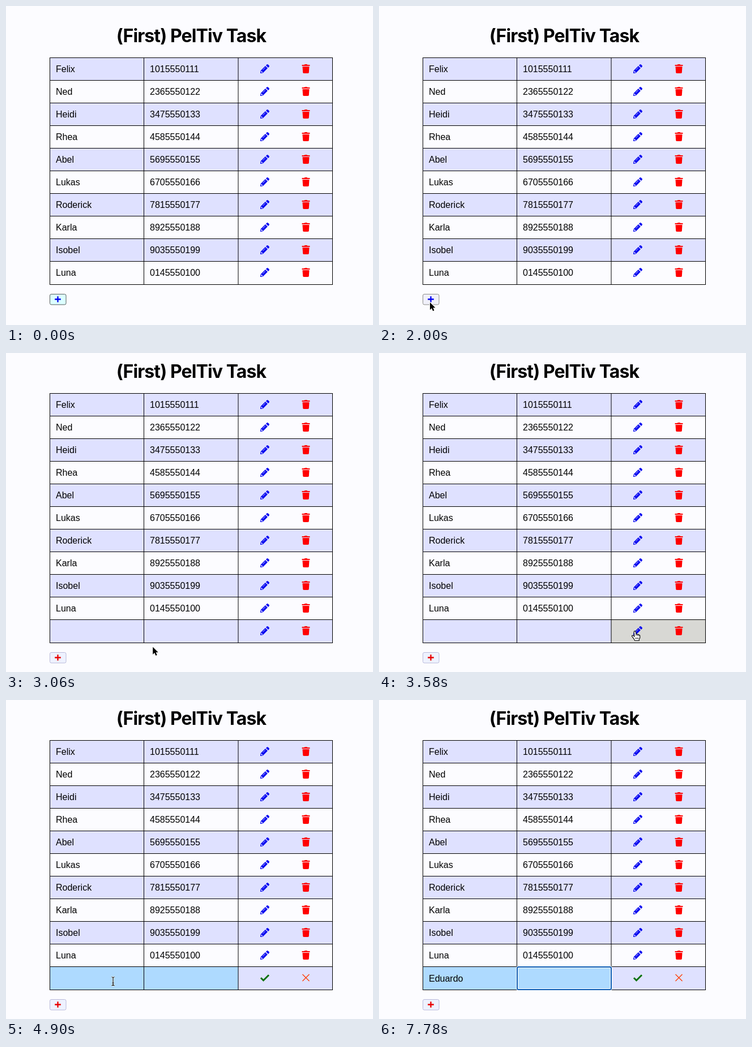
An HTML page with a canvas for the animation above (8000 ms loop, 648 by 564 pixels).

```html
<!DOCTYPE html>
<html lang="en">
<head>
<meta charset="utf-8">
<title>Contact table</title>
<style>
  html, body { margin: 0; width: 648px; height: 564px; overflow: hidden; background: #fcfcff; }
  canvas { display: block; }
</style>
</head>
<body>
<canvas id="stage" width="648" height="564"></canvas>
<script>
const ctx = document.getElementById('stage').getContext('2d');
const LOOP = 8000;
const COLS = [77, 243, 409.5, 576];
const ROW = 40;
const CELL_FONT = '16px "Liberation Sans", Arial, sans-serif';
const PAGE = '#fcfcff', STRIPE = '#dfe1ff', EDIT = '#aedaff', HOVER = '#d8d8d4';

const contacts = [
  ['Felix', '1015550111'], ['Ned', '2365550122'], ['Heidi', '3475550133'],
  ['Rhea', '4585550144'], ['Abel', '5695550155'], ['Lukas', '6705550166'],
  ['Roderick', '7815550177'], ['Karla', '8925550188'], ['Isobel', '9035550199'],
  ['Luna', '0145550100']
];
const NEW_NAME = 'Eduardo';

// Moments of the interaction, in ms
const AT = { overButton: 1120, add: 2060, edit: 4120, focus: 5140, type: 6180, typeRest: 6360, tab: 7200 };
const KEY_GAP = 150;

// Pointer path: time, x, y, easing into this point
const linear = u => u;
const easeOut = u => 1 - (1 - u) ** 2;
const smooth = u => u * u * (3 - 2 * u);
const path = [
  [100, 440, 575, linear], [820, 150, 546, linear], [1400, 90, 524, easeOut],
  [2240, 90, 524, linear], [2600, 149, 533, smooth], [2740, 160, 534, linear],
  [3560, 452, 492, smooth], [4380, 452, 492, linear],
  [4520, 419, 493, linear], [5160, 144, 498, easeOut]
];

function pointerAt(t) {
  const i = path.findIndex(k => k[0] > t);
  if (i === 0) return { x: path[0][1], y: path[0][2] };
  if (i < 0) {
    const end = path[path.length - 1];
    return { x: end[1], y: end[2] };
  }
  const [t0, x0, y0] = path[i - 1], [t1, x1, y1, ease] = path[i];
  const u = ease((t - t0) / (t1 - t0));
  return { x: x0 + (x1 - x0) * u, y: y0 + (y1 - y0) * u };
}

function typedCount(t) {
  if (t < AT.type) return 0;
  if (t < AT.typeRest) return 1;
  return Math.min(NEW_NAME.length, 2 + Math.floor((t - AT.typeRest) / KEY_GAP));
}

function rect(x, y, w, h, color) {
  ctx.fillStyle = color;
  ctx.fillRect(x, y, w, h);
}

function text(str, x, y) {
  ctx.font = CELL_FONT;
  ctx.fillStyle = '#000';
  ctx.fillText(str, x, y);
}

function stroke(d, color, width) {
  ctx.strokeStyle = color;
  ctx.lineWidth = width;
  ctx.stroke(new Path2D(d));
}

function at(x, y, draw) {
  ctx.save();
  ctx.translate(x, y);
  draw();
  ctx.restore();
}

const pencilShape = new Path2D(
  'M8.9 3.1L.7 11.3L0 15.1Q-.1 16.1 .9 16L4.7 15.3L12.9 7.1Z' +
  'M10 2L11.5 .5Q12.6 -.5 13.7 .5L15.5 2.3Q16.5 3.4 15.5 4.5L14 6Z');
const pencilTip = new Path2D('M2.75 13.25H4.25V14.4L2.2 14.7L1.3 13.8L1.6 11.75H2.75Z');
const trashShape = new Path2D(
  'M.5 1H4.3L4.7 .3Q4.9 0 5.2 0H8.8Q9.1 0 9.3 .3L9.7 1H13.5Q14 1 14 1.5V2.5Q14 3 13.5 3H.5Q0 3 0 2.5V1.5Q0 1 .5 1Z' +
  'M1 4H13L12.3 14.6Q12.2 16 10.8 16H3.2Q1.8 16 1.7 14.6Z');

function pencil(x, y, background) {
  at(x, y, () => {
    ctx.fillStyle = '#0000f0';
    ctx.fill(pencilShape);
    ctx.fillStyle = background;
    ctx.fill(pencilTip);
    stroke('M4.2 10.3L9 5.5', background, .9);
  });
}

function trash(x, y) {
  at(x, y, () => {
    ctx.fillStyle = '#f00';
    ctx.fill(trashShape);
  });
}

function confirmIcons(y, hovered) {
  at(449, y, () => stroke('M1 8.2L5.5 12.7L15 3.2', '#007000', 2.9));
  at(522.5, y, () => stroke('M1 2L13 14M13 2L1 14', hovered ? '#e83030' : '#ff3c08', 1.3));
}

function drawTitle(y) {
  ctx.save();
  ctx.font = 'bold 32px Inter, "Open Sans", sans-serif';
  ctx.letterSpacing = '-0.9px';
  ctx.textAlign = 'center';
  ctx.fillStyle = '#000';
  ctx.fillText('(First) PelTiv Task', 327, y);
  ctx.restore();
}

function drawTable(top, rows, t, overActions) {
  const editing = t >= AT.edit;
  const bottom = top + rows * ROW + 1;
  for (let i = 0; i < rows; i++) {
    const y = top + i * ROW;
    const isNew = i === contacts.length;
    const h = ROW + (i === rows - 1 ? 1 : 0);
    const stripe = i % 2 ? PAGE : STRIPE;
    const actions = isNew && overActions ? HOVER : stripe;
    rect(77, y, 333, h, isNew && editing ? EDIT : stripe);
    rect(410, y, 167, h, actions);
    if (isNew) {
      text(NEW_NAME.slice(0, typedCount(t)), 88, y + 27);
    } else {
      text(contacts[i][0], 88, y + 26);
      text(contacts[i][1], 254, y + 26);
    }
    if (isNew && editing) {
      confirmIcons(y + 12, overActions);
    } else {
      pencil(449, y + 12, actions);
      trash(522.5, y + 12);
    }
  }
  for (const x of COLS) rect(x, top, 1, bottom - top + 1, '#000');
  for (let i = 0; i < rows; i++) rect(77, top + i * ROW, 500, 1, '#000');
  rect(77, bottom, 500, 1, '#000');
}

function drawFocus(t) {
  const second = t >= AT.tab;
  const x = COLS[second ? 1 : 0] + 1;
  for (const [color, width] of [['#fff', 4], ['#0a5ab4', 2]]) {
    ctx.beginPath();
    ctx.roundRect(x, 472, 166, 40, 2.5);
    ctx.strokeStyle = color;
    ctx.lineWidth = width;
    ctx.stroke();
  }
  ctx.font = CELL_FONT;
  const n = second ? 0 : typedCount(t);
  const width = ctx.measureText(NEW_NAME.slice(0, n)).width;
  const blinkFrom = second ? 7280 : 5220;
  const typing = !second && t >= AT.type;
  if (typing || t < blinkFrom + 500) {
    rect(Math.round(x + 10 + width), 483, 1, 18, '#000');
  }
}

function drawButton(y, t) {
  const [fill, border, plus] =
    t < AT.overButton ? ['#dcffff', '#555d5d', '#0000f0'] :
    t < AT.add ? ['#f0f0fa', '#8c8c88', '#0000f0'] : ['#eef2ff', '#babada', '#e80000'];
  ctx.beginPath();
  ctx.roundRect(77.5, y + .5, 28.5, 18.5, 2.5);
  ctx.fillStyle = fill;
  ctx.fill();
  ctx.strokeStyle = border;
  ctx.lineWidth = 1;
  ctx.stroke();
  at(91.5, y + 9.5, () => stroke('M-5.3 0H5.3M0 -5.3V5.3', plus, 2.3));
}

const arrowShape = new Path2D('M0 0V13.2L3 10.3L5.2 15.2L7.5 14.2L5.4 9.5H9.5Z');
const handShape = new Path2D(
  'M-1.8 1Q-1.6 -.5 -.2 -.4Q1.1 -.2 1.3 1.2L2 5.3Q3.5 4.4 4.5 5.8Q6 5.1 6.8 6.6Q8.5 6.2 8.8 8' +
  'Q9.3 12 7.3 14.2V16.5H-.5Q-.8 14.5 -2.7 12.4Q-4 10.5 -5.4 8.9Q-5.8 7.5 -4.3 7.2Q-2.9 7.2 -1 9.3Z');

function drawPointer({ x, y }, kind) {
  ctx.save();
  ctx.translate(x, y);
  ctx.lineJoin = 'round';
  if (kind === 'beam') {
    const beam = 'M-2.5 -7.5Q0 -7.5 0 -5.5Q0 -7.5 2.5 -7.5M0 -6V6M-2.5 7.5Q0 7.5 0 5.5Q0 7.5 2.5 7.5M-1.5 3H1.5';
    stroke(beam, '#fff', 2.4);
    stroke(beam, '#000', 1.1);
  } else if (kind === 'hand') {
    ctx.fillStyle = '#fff';
    ctx.fill(handShape);
    ctx.strokeStyle = '#000';
    ctx.lineWidth = 1.1;
    ctx.stroke(handShape);
    stroke('M2 5.3V8M4.5 6V8.4M6.8 6.8V8.8M1.2 11V14M3.3 11V14M5.4 11V14', '#000', .8);
  } else {
    ctx.strokeStyle = '#fff';
    ctx.lineWidth = 2;
    ctx.stroke(arrowShape);
    ctx.fillStyle = '#000';
    ctx.fill(arrowShape);
  }
  ctx.restore();
}

function render(t) {
  const added = t >= AT.add;
  const shift = added ? -20 : 0;
  const pointer = pointerAt(t);
  const inNewRow = added && pointer.y > 471 && pointer.y < 512;
  const overActions = inNewRow && pointer.x > 409;
  const kind = overActions && pointer.x > 440 ? 'hand'
    : inNewRow && t >= AT.edit && pointer.x < 409 ? 'beam' : 'arrow';

  rect(0, 0, 648, 564, PAGE);
  drawTitle(64 + shift);
  drawTable(91 + shift, contacts.length + (added ? 1 : 0), t, overActions);
  drawButton(509 - shift, t);
  if (t >= AT.focus) drawFocus(t);
  if (t < AT.type) drawPointer(pointer, kind);
}

function frame() {
  render(performance.now() % LOOP);
  requestAnimationFrame(frame);
}
frame();
</script>
</body>
</html>
```
